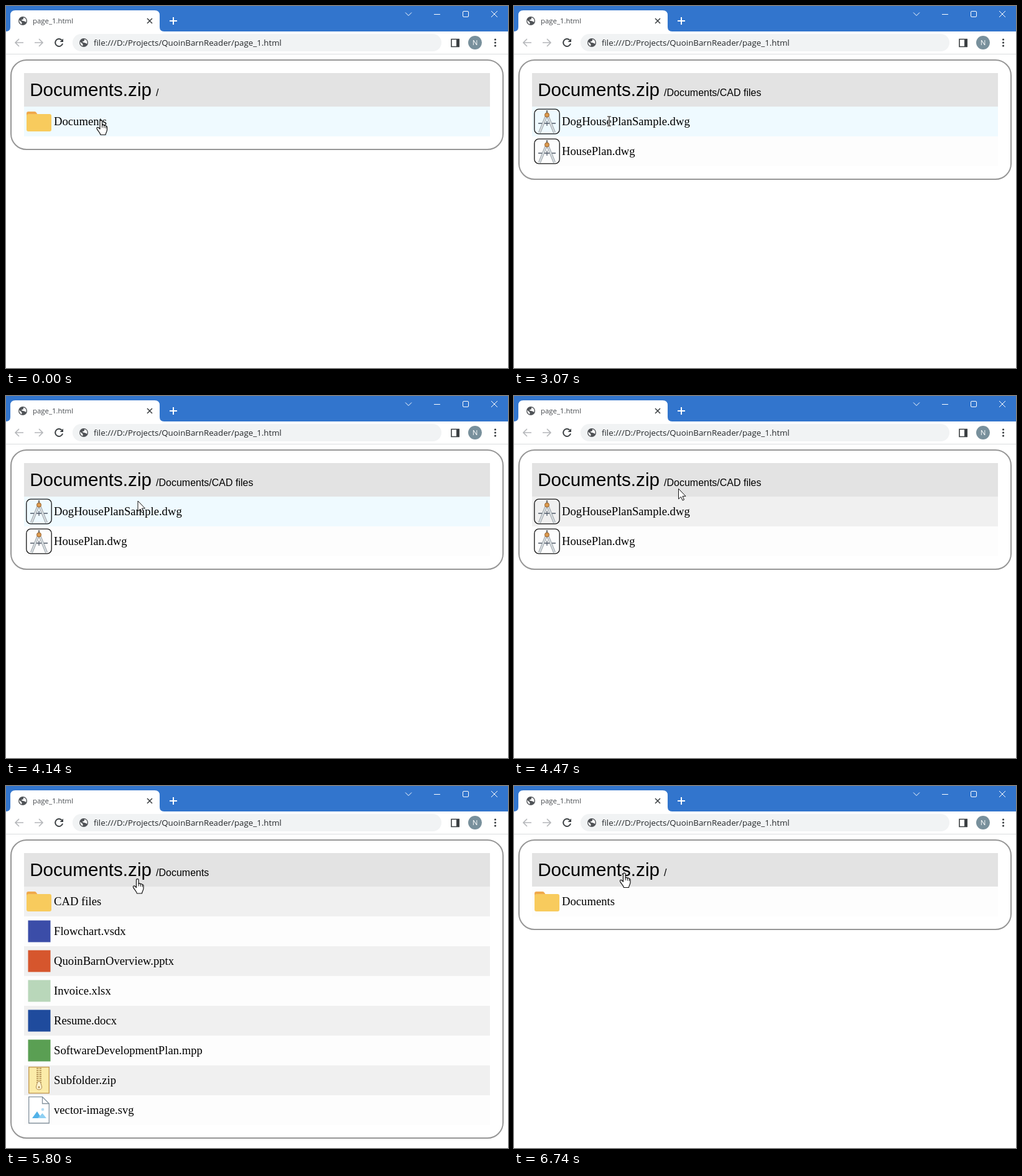
Write an HTML page that moves like this. It is 807 by 583 pixels and loops after 8.07 s.

```html
<!DOCTYPE html>
<html lang="en">
<head>
<meta charset="utf-8">
<title>Archive browser</title>
<style>
  html, body { margin: 0; width: 100%; height: 100%; overflow: hidden; background: #fff; }
  svg { display: block; width: 807px; height: 583px; }
  .ui { font-family: "Open Sans", "Noto Sans", sans-serif; }
  .head { font-family: "Liberation Sans", Arial, sans-serif; }
  .file { font: 18.667px "Liberation Serif", "Times New Roman", serif; }
  .line { fill: none; }
</style>
</head>
<body>
<svg viewBox="0 0 807 583">
  <defs>
    <g id="globe">
      <circle r="7" fill="#505357"/>
      <path d="M-5.6-1.2L-1.6 2.2V5.4C-4.2 4.8-6 2-5.6-1.2ZM1-5.5L4-4.2C5.6-2.4 6 0 5.2 2L2.6.6-1.6-.4-2-2 .8-2.6Z" fill="#fff"/>
    </g>
    <g id="folder">
      <path d="M33 22V11q0-3 3-3h10q2 0 3 2l2 3V22Z" fill="#f0a94c"/>
      <rect x="33" y="12" width="40" height="28" rx="3" fill="#f8cb5d"/>
    </g>
    <g id="zip">
      <rect x="36.7" y="2.7" width="32.6" height="42" fill="#fbeba8" stroke="#c39c56" stroke-width="1.4"/>
      <path d="M53 4V30" stroke="#b08d52" stroke-width="8" stroke-dasharray="1.6 1.6"/>
      <path d="M53 4V30" stroke="#fbeba8" stroke-width="1.2"/>
      <path d="M51 26h4l2.5 8q.5 5-4.500 5t-4.500-5Z" fill="#fdf3cf" stroke="#b08d52"/>
      <circle cx="53" cy="35" r="1.6" fill="#b08d52"/>
    </g>
    <g id="image">
      <path d="M36.700 2.700H58.500L69.300 13.500V45H36.700Z" fill="#fff" stroke="#84929d" stroke-width="1.3"/>
      <path d="M58.500 2.700V13.500H69.300" class="line" stroke="#84929d" stroke-width="1.3"/>
      <path d="M42 37L50 26 57 37Z" fill="#52b2e8"/>
      <path d="M51 37L58.500 29 65 37Z" fill="#8fd0f3"/>
      <circle cx="59" cy="23" r="2.300" fill="#b5def5"/>
    </g>
    <g id="compass" class="line">
      <rect x="32.800" y="4.200" width="40.400" height="39.600" rx="7" stroke="#151515" stroke-width="1.300"/>
      <path d="M51.500 16L41 42M54.500 16L65 42" stroke="#8f979d" stroke-width="4"/>
      <path d="M51.500 16L41 42M54.500 16L65 42" stroke="#dce1e4" stroke-width="2.200"/>
      <path d="M39 27H45M49 27H57M61 27H67M53 23V31" stroke="#4f5968" stroke-width="1.300"/>
      <path d="M53 6V11" stroke="#777" stroke-width="2.500"/>
      <circle cx="53" cy="13.500" r="3.500" fill="#dc9a4e" stroke="#95602c"/>
    </g>
    <g id="hand" stroke="#111" stroke-linejoin="round">
      <path d="M-2 2C-2-.6 1.600-.6 1.600 2V8C2.600 6.800 4.600 7.200 4.800 8.600 5.800 7.700 7.500 8.200 7.700 9.600 8.700 9 9.500 9.800 9.500 11V15C9.500 19 7.400 19.500 7 23.500H-1C-1.500 20-5.500 17-7 13.500-7.600 11.600-5.400 10.600-4 12L-2 14Z" fill="#fff" stroke-width="1.200"/>
      <path d="M1.600 8V12M4.800 8.600V12.500M7.700 9.600V13" class="line"/>
    </g>
    <path id="arrow" d="M0 0V16.500L4 13 6.500 18.800 9 17.700 6.500 12H11.500Z" fill="#fff" stroke="#111"/>
    <g id="beam" class="line">
      <path d="M-3-7.500H3M0-7.500V7.500M-3 7.500H3" stroke="#fff" stroke-width="3"/>
      <path d="M-3-7.500H3M0-7.500V7.500M-3 7.500H3" stroke="#111" stroke-width="1.200"/>
    </g>
  </defs>

  <g class="ui">
    <path d="M0 0H807V41H0Z" fill="#3275cd"/>
    <path d="M0 41Q7 41 7 34V15Q7 7 15 7H239Q247 7 247 15V34Q247 41 254 41Z" fill="#fff"/>
    <use href="#globe" x="27" y="24"/>
    <text x="43" y="28" font-size="11.4" fill="#45494d">page_1.html</text>
    <g class="line" stroke="#3c4043" stroke-width="1.600">
      <path d="M227 20l8 8m0-8l-8 8"/>
      <path d="M28 59H15m6-6l-6 6 6 6M46 59H59m-6-6l6 6-6 6" stroke="#b5b7ba"/>
      <path d="M89.500 54.800A6 6 0 1 0 91 60.500" stroke-width="2"/>
      <path d="M92 52.500V58H86.500Z" fill="#3c4043" stroke="none"/>
      <path d="M716 53.500H728V65.500H716Z"/>
      <path d="M724 53H729V66H724Z" fill="#3c4043" stroke="none"/>
    </g>
    <g class="line" stroke="#fff">
      <path d="M263 24H275M269 18V30" stroke-width="2"/>
      <path d="M642 10.500l5 5 5-5M688 13.500H698M780 8l10 10m0-10l-10 10"/>
      <rect x="734.500" y="8.500" width="9" height="9" rx="1.500"/>
    </g>
    <rect x="107" y="45" width="593" height="28" rx="14" fill="#f1f3f4"/>
    <use href="#globe" x="125" y="59"/>
    <text x="141" y="64" font-size="13.3" fill="#25282b">file:///D:/Projects/QuoinBarnReader/page_1.html</text>
    <circle cx="754" cy="59" r="11" fill="#78909c"/>
    <text x="754" y="63.300" font-size="11.5" fill="#fff" text-anchor="middle">N</text>
    <path d="M786.500 54v.01m0 5v.01m0 5v.01" stroke="#3c4043" stroke-width="3.200" stroke-linecap="round"/>
    <path d="M0 77.500H807" stroke="#dcdddf"/>
  </g>

  <rect id="panel" x="8" y="87" width="791" rx="25" class="line" stroke="#969696" stroke-width="2"/>
  <path d="M29 108H778V162H29Z" fill="#e3e3e3"/>
  <g class="head">
    <text x="38.200" y="145" font-size="29.6">Documents.zip</text>
    <text id="crumb" x="241" y="145" font-size="16"></text>
  </g>
  <g id="list"></g>
  <use id="cursor"/>
</svg>
<script>
const $ = id => document.getElementById(id);
const LOOP = 8070, STEP = 66.3, ROW = 48, TOP = 162;

// Each entry: file name, then an icon id or the colour of a plain square.
const pages = [
  { crumb: '/', files: [['Documents', 'folder']] },
  { crumb: '/Documents', files: [
    ['CAD files', 'folder'],
    ['Flowchart.vsdx', '#3b4da8'],
    ['QuoinBarnOverview.pptx', '#d6562d'],
    ['Invoice.xlsx', '#b9d7ba'],
    ['Resume.docx', '#1f4b9d'],
    ['SoftwareDevelopmentPlan.mpp', '#5a9f53'],
    ['Subfolder.zip', 'zip'],
    ['vector-image.svg', 'image']] },
  { crumb: '/Documents/CAD files', files: [
    ['DogHousePlanSample.dwg', 'compass'],
    ['HousePlan.dwg', 'compass']] }
];

// Cursor path: time, x, y
const path = [
  [0, 153, 184], [3803.7, 153, 184], [4135.2, 212, 169], [4599.3, 285.5, 141.5],
  [5533.7, 285.5, 141.5], [5798.9, 211.5, 149.5], [6064.1, 177.5, 140], [LOOP, 177.5, 140]
];

const icon = kind => kind[0] === '#'
  ? `<rect x="35.500" y="6.500" width="36" height="35" fill="${kind}"/>`
  : `<use href="#${kind}"/>`;

function rowMarkup([name, kind], i, files) {
  const fill = (files.length - i) % 2 ? '#fdfdfd' : '#f0f0f0';
  return `<g transform="translate(0 ${TOP + i * ROW})">
    <path d="M29 0H778V${ROW}H29Z" fill="${fill}"/>${icon(kind)}
    <text class="file" x="77" y="30">${name}</text></g>`;
}

const groups = pages.map(page => {
  const g = document.createElementNS('http://www.w3.org/2000/svg', 'g');
  g.innerHTML = page.files.map(rowMarkup).join('');
  $('list').append(g);
  const first = g.querySelector('path');
  return { g, first, plain: first.getAttribute('fill') };
});

const pageAt = t => t < 1540 ? 0 : t < 3070 ? 1 : t < 5000 ? 2 : t < 6740 ? 1 : 0;

function cursorAt(t) {
  const start = t < 5000 ? 3803.7 : 5533.7;
  const q = Math.max(0, start + Math.floor((t - start) / STEP + 1e-6) * STEP);
  const i = Math.max(1, path.findIndex(p => p[0] > q));
  const [t0, x0, y0] = path[i - 1], [t1, x1, y1] = path[i];
  const k = (q - t0) / (t1 - t0);
  return [x0 + (x1 - x0) * k, y0 + (y1 - y0) * k];
}

function draw(t) {
  const current = pageAt(t), page = pages[current], [x, y] = cursorAt(t);
  $('crumb').textContent = page.crumb;
  $('panel').setAttribute('height', TOP + page.files.length * ROW + 21 - 87 + .01);
  groups.forEach(({ g, first, plain }, i) => {
    g.style.display = i === current ? '' : 'none';
    first.setAttribute('fill', y > TOP ? '#effaff' : plain);
  });
  const shape = current !== 2 || y < 148.5 ? 'hand' : y > 176 ? 'beam' : 'arrow';
  $('cursor').setAttribute('href', '#' + shape);
  $('cursor').setAttribute('transform', `translate(${x} ${y + (shape === 'beam' ? 1.5 : 0)})`);
}

function tick() {
  draw(performance.now() % LOOP);
  requestAnimationFrame(tick);
}
tick();
</script>
</body>
</html>
```
